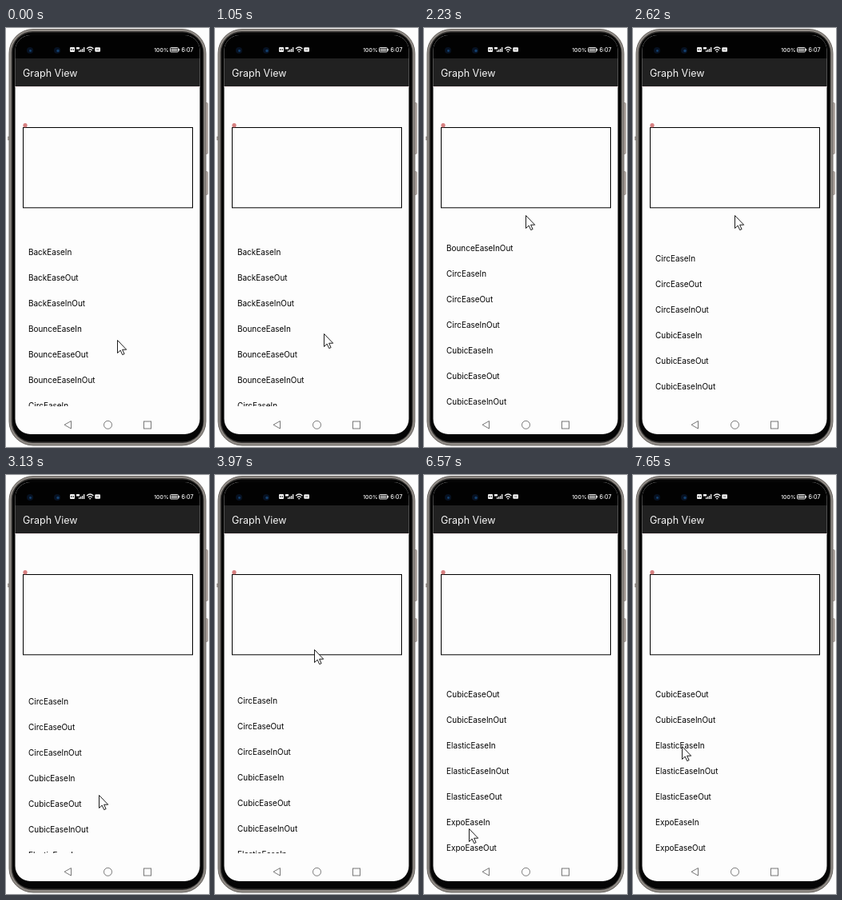
These frames come from a looping animation (254x524 px, 8000 ms). An HTML page:

```html
<!DOCTYPE html>
<html lang="en">
<head>
<meta charset="utf-8">
<title>Graph View</title>
<style>
html, body { margin: 0; width: 100%; height: 100%; overflow: hidden; background: #fdfdfd; }
svg { display: block; width: 254px; height: 524px; font-family: Inter, Roboto, sans-serif; }
</style>
</head>
<body>
<svg viewBox="0 0 254 524">
  <defs>
    <clipPath id="screen"><rect x="11.500" y="9" width="231" height="499" rx="19"/></clipPath>
    <clipPath id="viewport"><rect x="12" y="262" width="230" height="211"/></clipPath>
  </defs>

  <g fill="#b5aaa4" stroke="#75706c" stroke-width=".5">
    <rect x="248.500" y="93.500" width="4" height="64" rx="1.200"/>
    <rect x="248.500" y="179.500" width="4" height="29" rx="1.200"/>
    <rect x="2.500" y="136" width="3" height="4"/>
  </g>
  <rect x="4" y="1.500" width="246" height="520.500" rx="30" fill="#8f8a85" stroke="#66625e"/>
  <rect x="6.500" y="4" width="241" height="515" rx="27" fill="#3c3a38"/>
  <rect x="8" y="5.500" width="238.500" height="512" rx="25" fill="#050505"/>

  <g clip-path="url(#screen)">
    <rect x="11" y="9" width="232" height="499" fill="#fdfdfd"/>
    <rect x="11" y="9" width="232" height="29" fill="#020202"/>
    <rect x="11" y="38" width="232" height="35" fill="#212121"/>
    <rect x="11" y="73" width="232" height="1" fill="#f3e6e9"/>
  </g>

  <g fill="#071223">
    <circle cx="30" cy="28" r="4"/>
    <circle cx="64" cy="28" r="4"/>
  </g>
  <g fill="#14406e">
    <circle cx="30.500" cy="28.500" r="1.400"/>
    <circle cx="65" cy="28.500" r="1.700"/>
  </g>

  <g fill="#f4f4f4">
    <rect x="80" y="24" width="6" height="6" rx="1"/>
    <path d="M88 24h4v2.500h-4zM91 30v-2h1.300v2zM93 30v-3h1.300v3zM95 30v-4h1.300v4zM97 30v-6h1.300v6z"/>
    <rect x="111.300" y="24.300" width="6.700" height="5.400" rx="1"/>
    <g font-weight="500">
      <text x="185.300" y="29.800" font-size="6.800">100%</text>
      <text x="219.500" y="29.800" font-size="7.100">6:07</text>
    </g>
    <rect x="206.500" y="25.500" width="8" height="3.500" fill="#999"/>
    <rect x="216.200" y="26" width="1" height="2.500"/>
    <text x="21" y="60.700" font-size="12.500">Graph View</text>
  </g>
  <g fill="none" stroke="#f4f4f4">
    <path d="M101 26q4.200-4 8.400 0M102.800 28q2.400-2.400 4.800 0M104.200 29.600h2" stroke-width="1.200"/>
    <rect x="205.500" y="24.500" width="10" height="5.500" rx="1" stroke-width=".9"/>
    <path d="M81.500 26v2M84.500 26v2M81.500 27h3M113 27h3.500" stroke="#222" stroke-width=".7"/>
  </g>

  <rect x="21.500" y="124.500" width="212" height="100.300" fill="none" stroke="#000"/>
  <circle cx="24" cy="121.700" r="2.600" fill="#d67f80"/>

  <g clip-path="url(#viewport)"><g id="list" font-size="9.950" fill="#000"></g></g>

  <g fill="none" stroke="#777">
    <path d="M81.500 491.500v9.500l-8.500-4.750z"/>
    <circle cx="127.500" cy="496.300" r="5"/>
    <rect x="172.500" y="492" width="9" height="9"/>
  </g>

  <path id="cursor" d="M.5.500V16.500L4.200 13.100 6.700 18.600 9.100 17.600 6.600 12.200H11.700Z" fill="#fff" stroke="#111" stroke-width=".95"/>
</svg>
<script>
const LOOP = 8000, ROW = 32, TICK = 130;
const list = document.getElementById('list');
const cursor = document.getElementById('cursor');

// Easing names in the order the app lists them
const inOrder = ['In', 'Out', 'InOut'], mixed = ['In', 'InOut', 'Out'];
const families = { Back: inOrder, Bounce: inOrder, Circ: inOrder, Cubic: inOrder, Elastic: mixed, Expo: inOrder };
const names = Object.entries(families).flatMap(([name, kinds]) => kinds.map(kind => `${name}Ease${kind}`));
list.innerHTML = names.map((name, i) => `<text x="28" y="${283.6 + i * ROW}">${name}</text>`).join('');

const easeOut = p => 1 - (1 - p) ** 3;
const smooth = p => p * p * (3 - 2 * p);

// Pointer gestures; each one starts where the previous ended
const home = { x: 139, y: 390 };
const gestures = [
  { from: 260, to: 650, x: 139, y: 424, ease: easeOut },
  { from: 930, to: 1290, x: 127, y: 234, ease: smooth },
  { from: 2990, to: 3250, x: 114, y: 424, ease: easeOut },
  { from: 3500, to: 3900, x: 124, y: 218, ease: smooth },
  { from: 5720, to: 6370, x: 56, y: 442, ease: easeOut },
  { from: 6500, to: 6890, x: 93, y: 385, ease: smooth },
  { from: 6890, to: 7540, x: 61, y: 339, ease: smooth }
];

function pointerAt(t) {
  return gestures.reduce((point, { from, to, x, y, ease }) => {
    const p = ease(Math.min(1, Math.max(0, (t - from) / (to - from))));
    return { x: point.x + (x - point.x) * p, y: point.y + (y - point.y) * p };
  }, home);
}

const settle = (from, to, elapsed, tau) => to + (from - to) * Math.exp(-Math.max(0, elapsed) / tau);

function scrollAt(t) {
  if (t < 1690) return 0;
  if (t < 4160) return settle(96, 190, t - 1840, 276);
  return settle(190, 326, t - 4080, 95);
}

function place(element, x, y) {
  element.setAttribute('transform', `translate(${Math.round(x)} ${Math.round(y)})`);
}

function draw(now) {
  const t = Math.floor(now % LOOP / TICK) * TICK;
  const { x, y } = pointerAt(t);
  place(cursor, x, y);
  place(list, 0, -scrollAt(t));
}

const start = performance.now();
function frame() {
  draw(performance.now() - start);
  requestAnimationFrame(frame);
}
frame();
</script>
</body>
</html>
```
